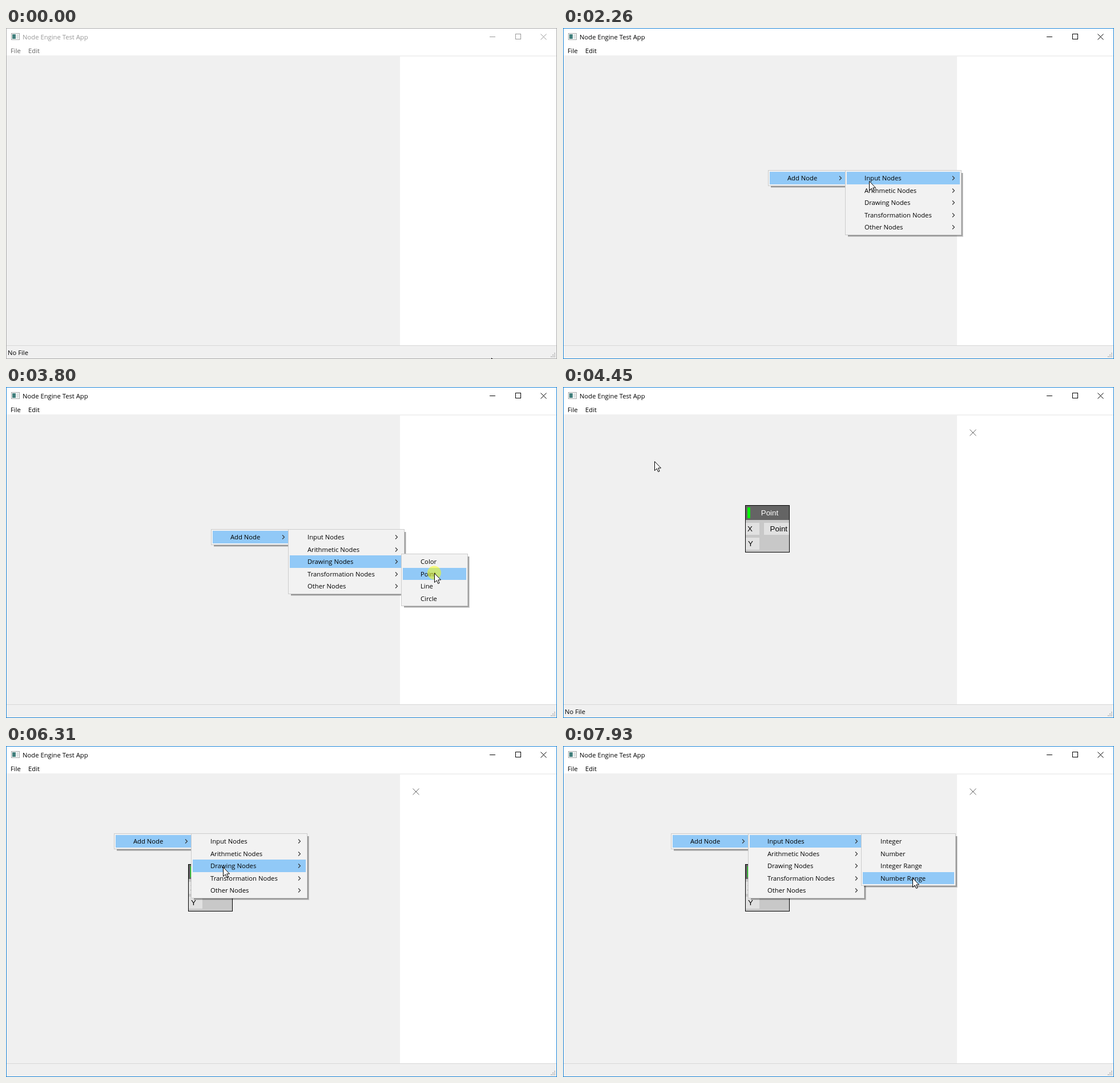
An HTML page with a canvas for the animation above (8 s loop, 965 by 580 pixels).

```html
<!DOCTYPE html>
<html lang="en">
<head>
<meta charset="utf-8">
<title>Node Engine Test App</title>
<style>
  html, body { margin: 0; width: 100%; height: 100%; overflow: hidden; background: #fff; }
  canvas { display: block; }
</style>
</head>
<body>
<canvas id="stage" width="965" height="580"></canvas>
<script>
const ctx = document.getElementById('stage').getContext('2d');
const LOOP = 8000;
const UI_FONT = '11.25px "Open Sans", sans-serif';
const NODE_FONT = '13.33px "Liberation Sans", Arial, sans-serif';
const ROW = 21.5;

const CATEGORIES = ['Input Nodes', 'Arithmetic Nodes', 'Drawing Nodes', 'Transformation Nodes', 'Other Nodes'];
const FOCUS = 930, NODE_ADDED = 3890;

// Each context menu: position, life span, and when its submenus open
const MENUS = [
  { x: 359, y: 249, from: 1390, to: NODE_ADDED, listAt: 1940, subAt: 2880,
    category: 2, items: ['Color', 'Point', 'Line', 'Circle'], width: 117 },
  { x: 189, y: 153, from: 5240, to: LOOP, listAt: 5780, subAt: 7080,
    category: 0, items: ['Integer', 'Number', 'Integer Range', 'Number Range'], width: 166 }
];

// Pointer moves: start, end, and the place reached
const MOVES = [
  [0, 760, 359, 250],
  [1390, 1620, 392, 264],
  [1900, 2550, 572, 306],
  [2880, 3280, 715, 307],
  [3420, 3650, 750, 326],
  [NODE_ADDED, 4450, 160, 130],
  [4500, 4600, 149, 126],
  [4690, 4920, 189, 154],
  [5240, 5540, 231, 168],
  [5780, 6310, 380, 212],
  [6390, 6540, 408, 197],
  [6620, 6770, 416, 170],
  [7080, 7850, 612, 231]
];

// Mouse button presses: start, length
const PRESSES = [[FOCUS, 80], [1240, 150], [3800, 90], [5070, 170]];

const during = (t, from, to) => t >= from && t < to;
const easeOut = k => 1 - (1 - k) ** 2;

// In a menu the pointer travels across first and then along the rows
function pointerAt(t) {
  const inMenu = MENUS.some(m => during(t, m.from, m.to));
  let x = 851, y = 579;
  for (const [start, end, toX, toY] of MOVES) {
    if (t < start) break;
    const k = Math.min(1, (t - start) / (end - start));
    x += (toX - x) * easeOut(k);
    y += (toY - y) * (inMenu ? k ** 4 : easeOut(k));
  }
  return [Math.round(x), Math.round(y)];
}

function rect(x, y, w, h, color) {
  ctx.fillStyle = color;
  ctx.fillRect(x, y, w, h);
}

function frame(x, y, w, h, color) {
  ctx.strokeStyle = color;
  ctx.lineWidth = 1;
  ctx.strokeRect(x + 0.5, y + 0.5, w - 1, h - 1);
}

function text(str, x, y, color = '#000', font = UI_FONT, align = 'left') {
  ctx.font = font;
  ctx.fillStyle = color;
  ctx.textAlign = align;
  ctx.fillText(str, x, y);
}

function stroke(path, color, width = 1) {
  ctx.strokeStyle = color;
  ctx.lineWidth = width;
  ctx.stroke(new Path2D(path));
}

function drawWindow(active, status) {
  const ink = active ? '#000' : '#999';
  rect(0, 0, 965, 580, '#fff');
  rect(1, 48, 963, 2, '#f0f0f0');
  rect(1, 49, 689, 508, '#f0f0f0');
  rect(1, 556, 963, 23, '#f0f0f0');
  rect(1, 556, 963, 1, '#d7d7d7');

  rect(9, 9, 15, 12, '#fff');
  frame(9, 9, 15, 12, '#a3a8a8');
  rect(11, 11, 6, 8, '#43807d');
  rect(18, 11, 4, 8, '#dfe4e4');

  text('Node Engine Test App', 29, 20, ink);
  text('File', 8, 44, active ? '#000' : '#666');
  text('Edit', 39, 44, active ? '#000' : '#666');
  stroke('M847 15.5h10', ink);
  frame(892, 10, 10, 10, ink);
  stroke('M936.5 10.5l10 10m0-10l-10 10', ink);

  if (status) text('No File', 3, 573);
  for (let i = 0; i < 3; i++)
    for (let j = 0; j <= i; j++) rect(960 - 3 * j, 569 + 3 * i, 2, 2, '#bfbfbf');
  frame(0, 0, 965, 580, active ? '#1883d7' : '#aaa');
}

function drawNode() {
  rect(319, 207, 78, 83, '#c8c8c8');
  rect(320, 208, 76, 25, '#646464');
  rect(323, 211, 5, 19, '#0af50a');
  rect(320, 238, 24, 21, '#e1e1e1');
  rect(320, 264, 24, 21, '#e1e1e1');
  rect(352, 238, 44, 21, '#e1e1e1');
  frame(319, 207, 78, 83, '#000');
  text('Point', 362, 225, '#fff', NODE_FONT, 'center');
  text('X', 323, 253, '#000', NODE_FONT);
  text('Y', 324, 279, '#000', NODE_FONT);
  text('Point', 393, 253, '#000', NODE_FONT, 'right');
  stroke('M712.5 74.5l11 11m0-11l-11 11', '#666');
}

function drawList(x, y, w, items, [px, py], openRow = -1, arrows = false) {
  const h = Math.round(items.length * ROW + 6);
  const rowTop = i => Math.round(y + 3 + i * ROW);
  for (let i = 1; i <= 3; i++) rect(x + 5, y + 5, w - 5 + i, h - 5 + i, 'rgba(0,0,0,.17)');
  rect(x, y, w, h, '#f2f2f2');
  frame(x, y, w, h, '#ccc');

  const inside = during(px, x + 3, x + w - 3);
  items.forEach((label, i) => {
    const top = rowTop(i), bottom = rowTop(i + 1);
    const hovered = inside && during(py, top, bottom);
    if (openRow < 0 ? hovered : openRow === i) rect(x + 3, top, w - 6, bottom - top, '#91c9f7');
    text(label, x + 34, top + 15);
    if (arrows) stroke(`M${x + w - 16} ${top + 7.5}l3.5 3.5l-3.5 3.5`, '#333', 1.1);
  });
}

function drawMenu({ x, y, listAt, subAt, category, items, width }, t, pointer) {
  const listOpen = t >= listAt, subOpen = t >= subAt;
  drawList(x, y, 141, ['Add Node'], pointer, listOpen ? 0 : -1, true);
  if (listOpen) drawList(x + 135, y, 204, CATEGORIES, pointer, subOpen ? category : -1, true);
  if (subOpen) drawList(x + 333, y + category * ROW, width, items, pointer);
}

function drawPointer([x, y], pressed) {
  if (pressed) {
    ctx.fillStyle = 'rgba(255,255,0,.5)';
    ctx.beginPath();
    ctx.arc(x, y - 0.5, 12, 0, 2 * Math.PI);
    ctx.fill();
  }
  ctx.save();
  ctx.translate(x + 0.5, y + 0.5);
  const arrow = 'M0 0V16L3.7 12.5L6.2 18L8.6 17L6.2 11.5H11Z';
  ctx.fillStyle = '#fff';
  ctx.fill(new Path2D(arrow));
  stroke(arrow, '#000');
  ctx.restore();
}

function draw(t) {
  const pointer = pointerAt(t);
  const menu = MENUS.find(m => during(t, m.from, m.to));
  drawWindow(t >= FOCUS, !menu);
  if (t >= NODE_ADDED) drawNode();
  if (menu) drawMenu(menu, t, pointer);
  drawPointer(pointer, PRESSES.some(([start, length]) => during(t, start, start + length)));
}

const begin = performance.now();
function tick() {
  draw((performance.now() - begin) % LOOP);
  requestAnimationFrame(tick);
}
tick();
</script>
</body>
</html>
```
